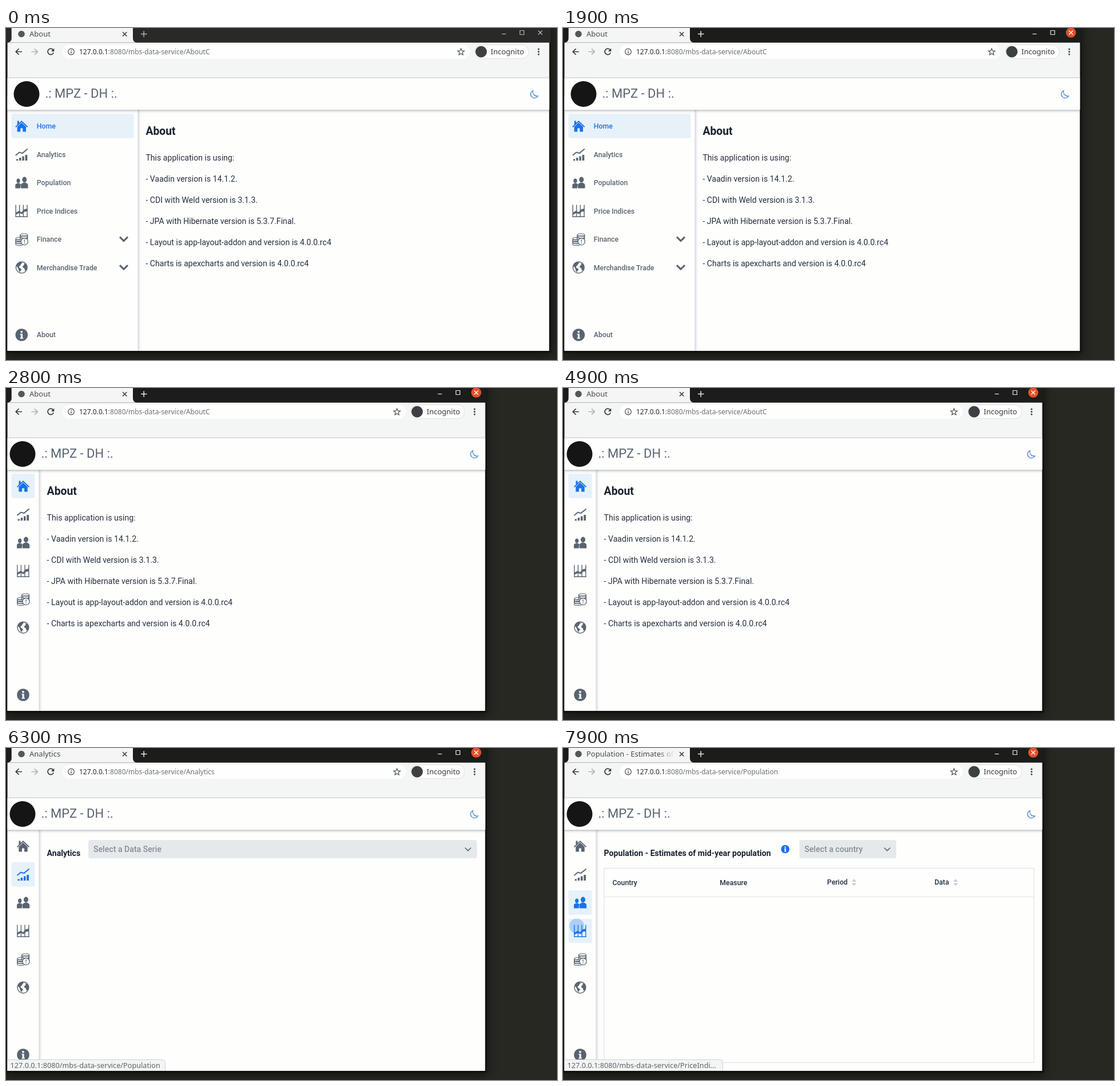
An HTML page for the animation above (8000 ms loop, 964x581 px).

```html
<!DOCTYPE html>
<html lang="en">
<head>
<meta charset="utf-8">
<style>
html, body { margin: 0; width: 100%; height: 100%; overflow: hidden; background: #272822; }
svg { display: block; white-space: pre; }
.ui { font-family: "Noto Sans", "Open Sans", sans-serif; }
.app { font-family: Roboto, Arial, sans-serif; }
.line { fill: none; stroke: currentColor; }
</style>
</head>
<body>
<svg id="stage" width="964" height="581" viewBox="0 0 964 581"></svg>
<script>
const stage = document.getElementById('stage');
const LOOP = 8000, LEFT = 2.5, FULL = 950.5, BOTTOM = 565, TOOLBAR = 25.6;
const INK = '#25303f', TITLE = '#18222f', GREY = '#596470', BLUE = '#1a73e8', PAPER = '#fefefd', BAR = '#f4f6f5';
const BODY = 14.12, SMALL = 12.32;

// [time, distance the right window edge has moved left]
const RESIZE = [[0, 0], [1200, 2], [1400, 7], [1500, 13], [1600, 18], [1700, 22], [1900, 46],
  [2100, 56], [2200, 70.5], [2300, 86], [2400, 99], [2500, 109], [2800, 112]];
const TITLES = [[0, 'About'], [5800, 'Analytics'], [7200, 'Population - Estimates of']];
const URLS = [[0, 'AboutC'], [5700, 'Analytics'], [7100, 'Population']];
const HINTS = [[0, ''], [5200, 'Analytics'], [6300, 'Population'], [7500, 'PriceIndi…']];
// [start, menu row, x, y]
const RIPPLES = [[5500, 1, 27, 225], [6900, 2, 27, 274], [7800, 3, 24, 311.5]];
const LINES = ['This application is using:', '- Vaadin version is 14.1.2.', '- CDI with Weld version is 3.1.3.',
  '- JPA with Hibernate version is 5.3.7.Final.', '- Layout is app-layout-addon and version is 4.0.0.rc4',
  '- Charts is apexcharts and version is 4.0.0.rc4'];

// Icons are drawn around their own centre
const coin = (x, y) => `<path class="line" stroke-width="1.2" d="M${x} ${y}v3.4c0 2.8 13 2.8 13 0v-3.4c0-2.8-13-2.8-13 0c0 2.8 13 2.8 13 0"/>`;
const ICONS = {
  Home: `<path d="M-11 1L0-9.5 11 1 9.8 2.3 0-7-9.8 2.3ZM-7.7 1.4L0-6 7.7 1.4V10H2V4H-2V10H-7.7ZM-7.5-9h3v5.4l-3 2.8Z"/>`,
  Analytics: `<path d="M-9.5 8.5h3.5V11h-3.5ZM-4.3 6h3.5v5h-3.5ZM1 3.5h3.5V11H1ZM6.3 1h3.7v10H6.3Z"/>
    <path class="line" stroke-width="1.9" d="M-10.5 2L-4-3.5 1.5-2 10.5-9.5"/>`,
  Population: `<ellipse cx="-5.8" cy="-3.3" rx="3.1" ry="3.9"/><ellipse cx="5" cy="-5.2" rx="4" ry="4.9"/>
    <path d="M-11 10V4.5C-11 2-8 1.5-7 1h2.5C-3 1.7-1.8 2-1.4 3.2L-2.4 10ZM-1.2 10V4.5C-1.2 1.5 2 1 3.2 0h3.6C8 1 11.2 1.5 11.2 4.5V10Z"/>`,
  'Price Indices': `<path class="line" stroke-width="1.4" d="M-10.2-10.5V10.2H10.8M-3.6-10.5V10M3-10.5V10M9.8-10.5V10"/>
    <path d="M-10 3L-4.5 0 0 2.3 4-2.5 10-4V1L5 1.5 1 5.7-4 3.7-10 6.7Z"/>`,
  Finance: coin(-2.5, -7.5) + coin(-2.5, -3.7) + coin(-10.3, -1) + coin(-10.3, 2.6) + coin(-10.3, 5.4) +
    `<circle cx="5" cy="4" r="6.1" fill="${PAPER}" stroke="currentColor" stroke-width="1.3"/>
    <path d="M4.3 .4h1.4l-.2 4.2h-1ZM4.3 6h1.4v1.5h-1.4Z"/>`,
  'Merchandise Trade': `<circle class="line" r="9.9" stroke-width="1.4"/>
    <path d="M-9.3-3C-8-7-4-9.3-.5-9.5L1-7.5-1.5-5.5-2-3.5-4.5-2-4 .5-1 2.2 0 4-2.2 6.2-3 8.7-5 5-6 1.5ZM4-6.5L7.5-6.5 9.3-2 9.5 3 7.3 6 5.3 4.5 5 1.5 2.3 .3 2-2.5 4.3-4Z"/>`,
  About: `<circle r="10.8"/><path fill="${PAPER}" d="M-1.7-6.8h3.4v3.2h-3.4ZM-2.6-1.8h4.3v6.8h1.2v1.8h-5.5V5h1.2V0h-1.2Z"/>`
};
const ITEMS = Object.keys(ICONS);
const rowY = i => i === 6 ? 537 : 171.6 + 49.5 * i;

const clamp = v => Math.max(0, Math.min(1, v));
const at = (list, t) => list.filter(e => e[0] <= t).pop()[1];
const text = (x, y, s, size, fill = INK, weight = 400) =>
  `<text x="${x}" y="${y}" font-size="${size}" fill="${fill}" font-weight="${weight}">${s}</text>`;
const rect = (x, y, w, h, fill, more = '') => `<rect x="${x}" y="${y}" width="${w}" height="${h}" fill="${fill}" ${more}/>`;
const circle = (x, y, r, fill, more = '') => `<circle cx="${x}" cy="${y}" r="${r}" fill="${fill}" ${more}/>`;
const path = (d, color, width) => `<path d="${d}" fill="none" stroke="${color}" stroke-width="${width}"/>`;
const shadow = (x, y, blur, alpha) => `style="filter:drop-shadow(${x}px ${y}px ${blur}px rgba(32,56,82,${alpha}))"`;

function highlights(t) {
  const ramp = (start, span) => clamp((t - start) / span);
  return [1 - ramp(5800, 300), ramp(5200, 200) - ramp(7200, 300), ramp(6300, 200), ramp(7500, 200), 0, 0, 0];
}

function star(x, y) {
  let d = '';
  for (let i = 0; i < 10; i++) {
    const r = i % 2 ? 2.7 : 6.2, a = i * Math.PI / 5;
    d += (i ? 'L' : 'M') + (x + r * Math.sin(a)).toFixed(2) + ' ' + (y - r * Math.cos(a)).toFixed(2);
  }
  return path(d + 'Z', '#505357', 1.2);
}

function chrome(t, right) {
  const focused = t >= 500, hot = t >= 1200;
  const mark = focused ? '#e8e8e6' : '#b5b5b2', close = right - 15.8;
  return `<g class="ui">` +
    rect(0, -30, right + 3, 598.5, '#12120f', 'style="filter:drop-shadow(0 4px 9px rgba(0,0,0,.5))"') +
    rect(0, 0, right + 2.5, TOOLBAR, focused ? '#1c1c1a' : '#292927') +
    rect(LEFT, TOOLBAR, right - LEFT, 62, BAR) +
    `<path d="M${LEFT} ${TOOLBAR}Q9.700 25 9.700 18V0H222V18Q222 25 229 ${TOOLBAR}Z" fill="${BAR}"/>` +
    circle(27, 10.5, 5.8, '#55585a') +
    text(41, 15, at(TITLES, t), 13, '#46494c') +
    rect(168, 1, 30, 22, 'url(#fade)') +
    path('M204 7l7.4 7.4m0-7.4l-7.4 7.4', '#3c4043', 1.5) +
    path('M236 10.500h10.500m-5.300-5.300v10.500', mark, 1.5) +
    path(`M${right - 83} 10.500h7`, mark, 1.2) +
    path(`M${right - 51.3} 4.500h7v7h-7Z`, mark, 1.2) +
    (hot ? circle(close, 8, 8.8, '#e2512a') : '') +
    path(`M${close - 3.5} 4.500l7 7m0-7l-7 7`, hot ? '#fff' : mark, 1.3) +
    path('M28 41.500H17.500M22.500 36.300L17.200 41.500 22.500 46.700', '#3a3d40', 1.7) +
    path('M44.500 41.500H55M50 36.300L55.300 41.500 50 46.700', '#b0b3b5', 1.7) +
    path('M82.500 38.300A5.200 5.200 0 1 0 83.200 43', '#3a3d40', 1.7) +
    `<path d="M84.300 35.500v5.500h-5.500Z" fill="#3a3d40"/>` +
    rect(99, 29.2, right - 238.5, 24.6, PAPER, 'rx="12.300"') +
    circle(114, 41.5, 5.3, 'none', 'stroke="#505357" stroke-width="1.200"') +
    path('M114 40.800v4M114 38.300v1.500', '#505357', 1.3) +
    text(128, 46, `127.0.0.1<tspan fill="#6c7074">:8080/mbs-data-service/${at(URLS, t)}</tspan>`, 12, '#26292c') +
    star(right - 154.5, 42) +
    rect(right - 130, 29.5, 94, 24, PAPER, 'rx="12" stroke="#e2dfe2"') +
    circle(right - 119.2, 41.5, 10, '#3c4043') +
    text(right - 102.5, 46, 'Incognito', 13, '#33363a') +
    [37, 41.5, 46].map(y => circle(right - 18.7, y, 1.5, '#3c4043')).join('') +
    rect(LEFT, 86.5, right - LEFT, 1, '#cdd0d0') + '</g>';
}

function select(x, w, label) {
  return rect(x, 161, w, 32, '#e6e9eb', 'rx="3.500"') + text(x + 9, 182, label, BODY, '#858d96', 500) +
    path(`M${x + w - 21} 174.500l5.200 5.200 5.200-5.200`, '#626d79', 1.7);
}

function content(t, x) {
  if (t < 5800) return text(x, 187, 'About', 19.36, TITLE, 700) +
    LINES.map((s, i) => text(x, 231.6 + 37.15 * i, s, BODY)).join('');
  if (t < 7200) return text(x, 188.5, 'Analytics', BODY, TITLE, 700) + select(144, 680, 'Select a Data Serie');
  const sorter = cx => `<path d="M${cx - 4} 234l4-5 4 5ZM${cx - 4} 236.500l4 5 4-5Z" fill="#c9ced4"/>`;
  return text(x, 188.5, 'Population - Estimates of mid-year population', BODY, TITLE, 700) +
    `<g transform="translate(388.800 177) scale(.68)" fill="${BLUE}">${ICONS.About}</g>` +
    select(413.5, 169.5, 'Select a country') +
    rect(72, 210.5, 752, 340, 'none', 'stroke="#dcdfe2"') + rect(72, 260, 752, 1, '#e3e6e8') +
    ['Country', 'Measure', 'Period', 'Data'].map((s, i) =>
      text(86.5 + 187.8 * i, i < 2 ? 239.5 : 238.5, s, SMALL, INK, 500)).join('') +
    sorter(509.3) + sorter(686.8);
}

function menu(t, narrow) {
  const w = narrow ? 41 : 214, cx = narrow ? 30 : 27.3, lit = highlights(t);
  const rows = ITEMS.map((name, i) => {
    const y = rowY(i), color = `color-mix(in srgb, ${BLUE} ${lit[i] * 100}%, ${GREY})`;
    return rect(9.5, y - 21.3, w, 42.4, '#e6f1fa', `rx="3" opacity="${lit[i]}"`) +
      `<g transform="translate(${cx} ${y})" style="color:${color};fill:${color}">${ICONS[name]}</g>` +
      (narrow ? '' : text(53.8, y + 4.4, name, SMALL, color, 500)) +
      (!narrow && (i === 4 || i === 5) ? path(`M199 ${y - 4}l7 7 7-7`, GREY, 3) : '');
  });
  const waves = RIPPLES.map(([start, row, x, y]) => {
    const age = (t - start) / 100;
    if (age <= 0 || age >= 5) return '';
    return `<clipPath id="row${row}">${rect(9.5, rowY(row) - 21.3, w, 42.4, '#000', 'rx="3"')}</clipPath>` +
      circle(x, y, 13 * age, BLUE, `opacity="${.28 * (1 - (age - 1) / 4)}" clip-path="url(#row${row})"`);
  });
  return rows.join('') + waves.join('');
}

function page(t, right) {
  const narrow = t >= 2200, drawer = narrow ? 57.5 : 230.5, shift = narrow ? -7 : 0;
  // The page layout trails the window during the fast part of the drag
  const layout = t >= 2200 && t < 2500 ? FULL - at(RESIZE, t - 100) : right;
  const moon = layout - 26.5 - shift, hint = at(HINTS, t);
  return `<clipPath id="view">${rect(LEFT, 87.5, right - LEFT, BOTTOM - 87.5, '#000')}</clipPath>
    <g class="app" clip-path="url(#view)">` +
    rect(0, 87, right, 480, PAPER) + content(t, narrow ? 71.6 : 244.4) +
    rect(-20, 120, drawer + 20, 480, PAPER, shadow(1, 0, 2.5, .32)) + menu(t, narrow) +
    rect(-20, 87.5, right + 50, 55.7, PAPER, shadow(0, 1, 2.5, .45)) +
    circle(36 + shift, 115.5, 22.5, '#151515') +
    text(68.5 + shift, 122, '.: MPZ - DH :.', 22, GREY) +
    path(`M${moon - 2} 109.500a6.800 6.800 0 1 0 8.700 9.300a7.200 7.200 0 0 1-8.700-9.300Z`, '#3f82c9', 1.2) +
    (hint ? `<g class="ui">` +
      `<path d="M0 545.500H${hint.endsWith('…') ? 275.5 : 274.5}q4 0 4 4V570H0Z" fill="#f3f5f4" stroke="#cfd2d2"/>` +
      text(7.5, 559.7, '127.0.0.1:8080/mbs-data-service/' + hint, 12.7, '#5f6368') + '</g>' : '') +
    '</g>';
}

function draw(t) {
  const right = FULL - at(RESIZE, t);
  stage.innerHTML = `<linearGradient id="fade"><stop stop-color="${BAR}" stop-opacity="0"/>
    <stop offset=".9" stop-color="${BAR}"/></linearGradient>` + chrome(t, right) + page(t, right);
}

let shown = -1;
const begin = performance.now();
function tick() {
  const t = Math.floor((performance.now() - begin) % LOOP / 100) * 100;
  if (t !== shown) draw(shown = t);
  requestAnimationFrame(tick);
}
tick();
</script>
</body>
</html>
```
